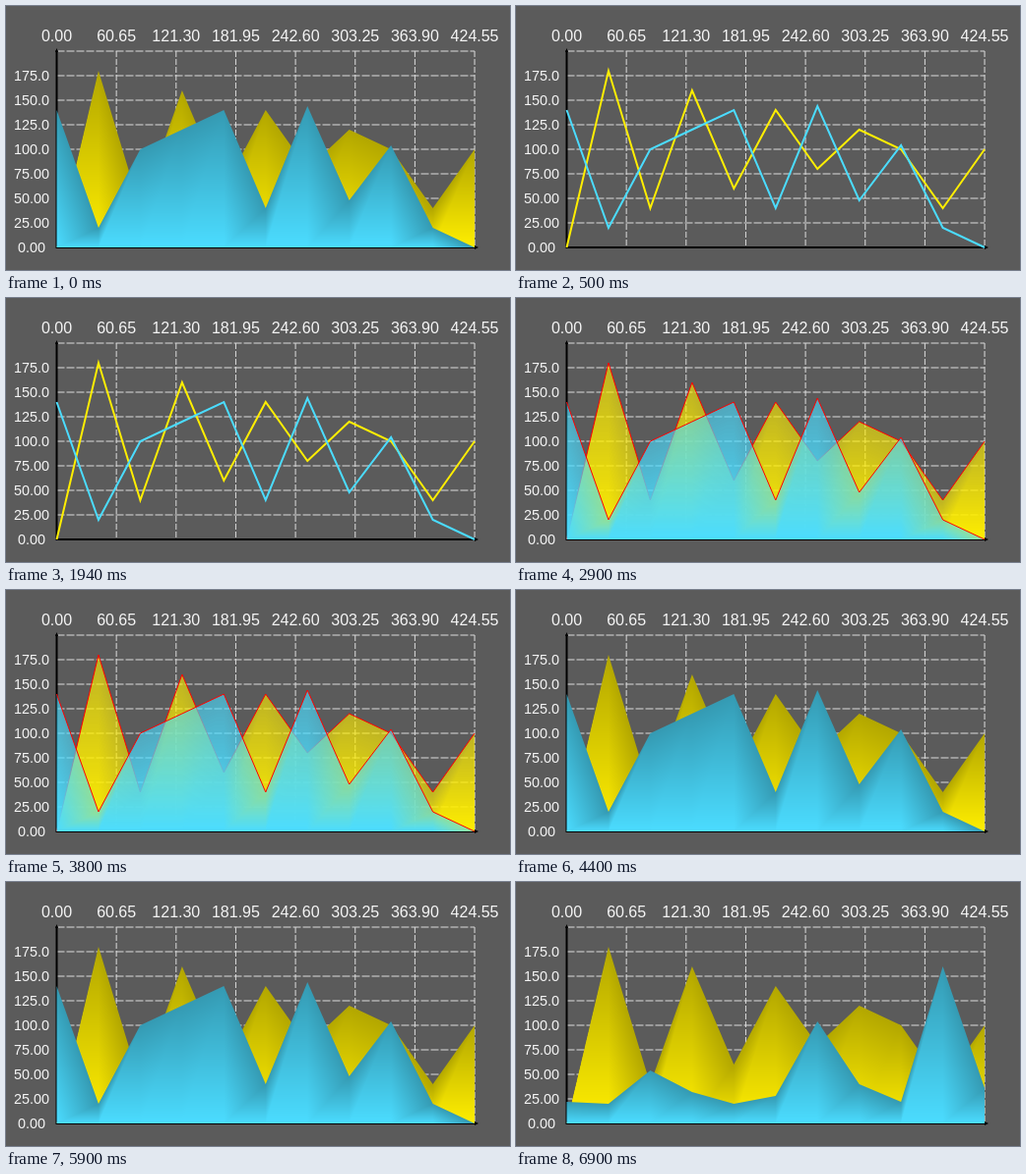
An HTML page with a canvas for the animation above (8 s loop, 512 px wide and 269 px high).

```html
<!DOCTYPE html>
<html lang="en">
<head>
<meta charset="utf-8">
<title>Area chart</title>
<style>
html, body { margin: 0; width: 100%; height: 100%; overflow: hidden; background: #5b5b5b; }
svg, canvas { position: absolute; left: 0; top: 0; width: 512px; height: 269px; }
text { font-family: "Liberation Sans", Arial, sans-serif; fill: #f4f4f4; text-anchor: middle; }
.grid { stroke: #dcdcdc; stroke-width: 1; }
</style>
</head>
<body>
<svg id="frame" viewBox="0 0 512 269"></svg>
<canvas id="plot" width="512" height="269"></canvas>
<script>
const W = 512, H = 269, LEFT = 51.5, BASE = 246, WIDTH = 424.55, STEP = WIDTH / 10;
const YELLOW = [255, 238, 0], BLUE = [75, 220, 255];
const gold = [0, 180, 40, 160, 60, 140, 80, 120, 100, 40, 100];
const sky = [140, 20, 100, 120, 140, 40, 144, 48, 104, 20, 0];
const skyNext = [22, 20, 54, 32, 20, 28, 104, 40, 22, 160, 36];
const LOOP = 8000;
const steps = [
  { at: 0, mode: "solid", front: sky },
  { at: 500, mode: "line", front: sky },
  { at: 2900, mode: "glass", front: sky },
  { at: 4400, mode: "solid", front: sky },
  { at: 6900, mode: "solid", front: skyNext }
];

function buildFrame() {
  const parts = [];
  const line = (x1, y1, x2, y2, attrs) =>
    parts.push(`<line x1="${x1}" y1="${y1}" x2="${x2}" y2="${y2}" ${attrs}/>`);
  const label = (x, y, size, s) =>
    parts.push(`<text x="${x}" y="${y}" font-size="${size}">${s}</text>`);
  for (let i = 0; i < 8; i++) {
    const x = LEFT + i * WIDTH / 7, y = BASE - i * 25;
    label(x, 36, 16, (i * 60.65).toFixed(2));
    label(26, y + 5, 14.4, (i * 25).toFixed(i > 3 ? 1 : 2));
    if (i) {
      line(x, 46, x, BASE, 'class="grid" stroke-dasharray="6 2"');
      line(LEFT, y - 25, LEFT + WIDTH, y - 25, 'class="grid" stroke-dasharray="8 2"');
    } else {
      line(LEFT, y - 25, LEFT + WIDTH, y - 25, 'class="grid" stroke-dasharray="8 2"');
    }
  }
  line(51.5, 45, 51.5, 247, 'stroke="#000" stroke-width="2"');
  line(51, 246, 478, 246, 'stroke="#000" stroke-width="2"');
  parts.push('<path d="M50 47L51.5 43L53 47ZM476 244L480 246L476 248Z"/>');
  document.getElementById("frame").innerHTML = parts.join("");
}

const ctx = document.getElementById("plot").getContext("2d");

function trace(data, close) {
  ctx.beginPath();
  data.forEach((v, i) => ctx.lineTo(LEFT + i * STEP, BASE - v));
  if (close) {
    ctx.lineTo(LEFT + WIDTH, BASE);
    ctx.lineTo(LEFT, BASE);
    ctx.closePath();
  }
}

// Each slice is two triangles split from its lower left to its upper right corner.
function shade(data, color, glass) {
  const tile = document.createElement("canvas");
  tile.width = W;
  tile.height = H;
  const tc = tile.getContext("2d"), img = tc.createImageData(W, H);
  for (let x = 49; x < 480; x++) {
    const pos = Math.min(9.999, Math.max(0, (x + 0.5 - LEFT) / STEP));
    const i = Math.floor(pos), f = pos - i, a = data[i], b = data[i + 1];
    for (let y = 40; y < 248; y++) {
      const h = BASE - y - 0.5;
      const raw = h < b * f ? 1 - h / b : (a + (b - a) * f - h) / (a || 1);
      const t = Math.min(1, Math.max(0, raw));
      const dim = glass ? 1 : 0.7 + 0.3 * t;
      const p = (y * W + x) * 4;
      for (let c = 0; c < 3; c++) img.data[p + c] = color[c] * dim;
      img.data[p + 3] = glass ? 255 * (0.6 + 0.4 * t) : 255;
    }
  }
  tc.putImageData(img, 0, 0);
  return ctx.createPattern(tile, "no-repeat");
}

function drawSeries(data, color, mode) {
  if (mode !== "line") {
    trace(data, true);
    ctx.fillStyle = shade(data, color, mode === "glass");
    ctx.fill();
  }
  if (mode !== "solid") {
    trace(data);
    ctx.lineWidth = mode === "line" ? 2 : 1;
    ctx.strokeStyle = mode === "line" ? `rgb(${color})` : "#f00";
    ctx.stroke();
  }
}

let shown = null;
function render() {
  const t = performance.now() % LOOP;
  const step = steps.filter(s => s.at <= t).pop();
  if (step !== shown) {
    shown = step;
    ctx.clearRect(0, 0, W, H);
    drawSeries(gold, YELLOW, step.mode);
    drawSeries(step.front, BLUE, step.mode);
  }
  requestAnimationFrame(render);
}

buildFrame();
render();
</script>
</body>
</html>
```
